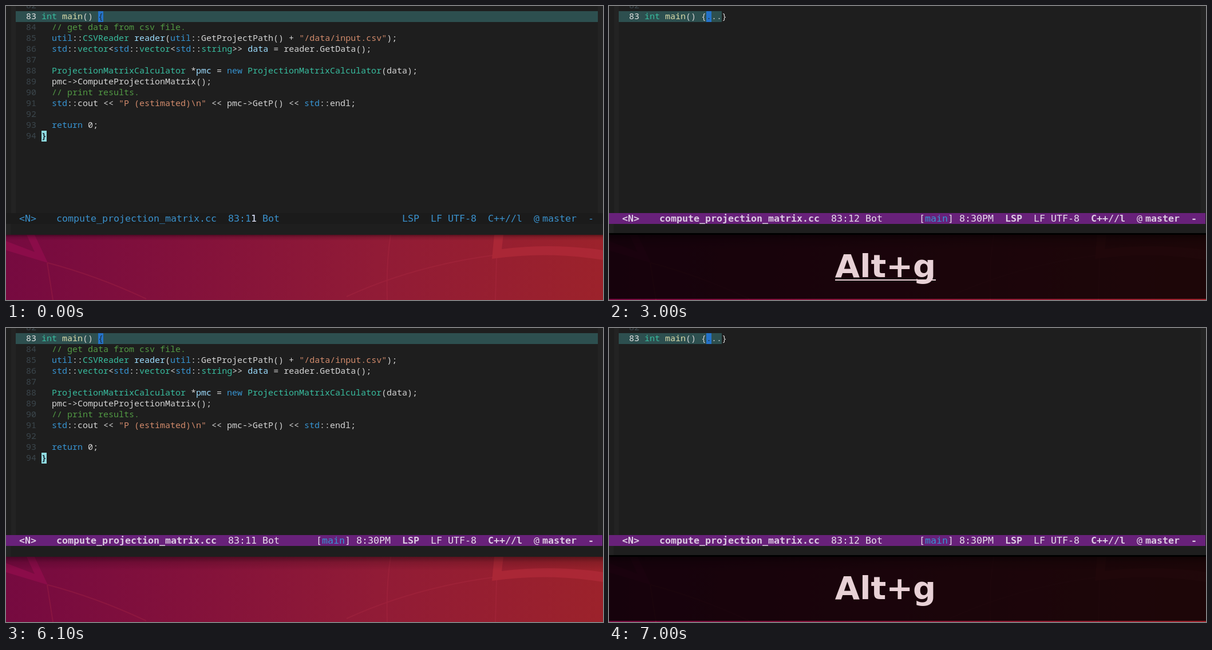
Recreate the animation shown at these times as an HTML page. Size 1043x514 px, loop 8000 ms.

```html
<!DOCTYPE html>
<html lang="en">
<head>
<meta charset="utf-8">
<title>Code folding</title>
<style>
html, body { margin: 0; width: 100%; height: 100%; overflow: hidden; background: #1e1e1e; }
svg { display: block; width: 1043px; height: 514px; }
text { white-space: pre; }

.ed { font: 15px "Noto Sans Mono", monospace; fill: #d4d4d4; }
.ln { fill: #3b464c; }
.t { fill: #38bd9f; }
.k { fill: #3794d2; }
.v { fill: #9cdcfe; }
.f { fill: #dcdcaa; }
.c { fill: #529a44; }
.s { fill: #d18a6b; }
.n { fill: #e4e4e4; }
.d { fill: #1e2c38; }

.bar { font: 16.61px "DejaVu Sans Mono", monospace; }
.off { fill: #3a91cc; }
.on { fill: #e6dcea; }
.b { font-weight: bold; fill: #dccbe2; }
.key { font: bold 56px "DejaVu Sans", sans-serif; fill: #e8d1d6; text-anchor: middle; }

/* timeline: hard cuts in an 8 s loop */
.open, .fold, .idle, .live, .panel, .one, .two, .line {
  animation: 8s step-end infinite; visibility: hidden;
}
.open { animation-name: open; }
.fold { animation-name: fold; }
.idle { animation-name: idle; }
.live { animation-name: live; }
.panel { animation-name: panel; }
.one { animation-name: one; }
.two { animation-name: two; }
.line { animation-name: line; }
@keyframes open { 0%, 60% { visibility: visible } 37.5%, 85%, 100% { visibility: hidden } }
@keyframes fold { 0%, 60% { visibility: hidden } 37.5%, 85%, 100% { visibility: visible } }
@keyframes idle { 0% { visibility: visible } 18.75%, 100% { visibility: hidden } }
@keyframes live { 0% { visibility: hidden } 18.75%, 100% { visibility: visible } }
@keyframes panel { 0%, 76.25% { visibility: hidden } 37.5%, 86.25%, 100% { visibility: visible } }
@keyframes one { 0%, 60% { visibility: hidden } 37.5%, 86.25%, 100% { visibility: visible } }
@keyframes two { 0%, 76.25%, 100% { visibility: hidden } 60% { visibility: visible } }
@keyframes line { 0%, 38.75%, 87.5%, 100% { visibility: hidden } 37.5%, 86.25% { visibility: visible } }
</style>
</head>
<body>
<svg viewBox="0 0 1043 514">
  <defs>
    <linearGradient id="wall" gradientUnits="userSpaceOnUse" x1="0" y1="440" x2="1043" y2="490">
      <stop offset="0" stop-color="#760a40"/>
      <stop offset=".3" stop-color="#83113b"/>
      <stop offset=".62" stop-color="#911b36"/>
      <stop offset="1" stop-color="#9c222b"/>
    </linearGradient>
    <linearGradient id="shade" x1="0" y1="0" x2="0" y2="1">
      <stop offset="0" stop-opacity=".4"/>
      <stop offset=".4" stop-opacity=".14"/>
      <stop offset="1" stop-opacity="0"/>
    </linearGradient>
  </defs>

  <!-- wallpaper -->
  <rect y="400" width="1043" height="114" fill="url(#wall)"/>
  <path d="M0 411L50 430L36 400H50L73 449L0 427Z" fill="#920d4c" opacity=".75"/>
  <path d="M853 400H869L866 425Q955 414 1043 427V444Q945 428 849 442Z" fill="#b02a38" opacity=".75"/>
  <g fill="none" stroke="#b83048" stroke-width="2" opacity=".25">
    <path d="M72 449L82 514M73 449Q160 472 245 512"/>
    <path d="M672 400Q664 450 666 514M857 441L855 514M595 508Q710 455 850 436"/>
  </g>
  <rect class="idle" y="400" width="1043" height="10" fill="url(#shade)"/>
  <rect class="live" y="400" width="1043" height="24" fill="url(#shade)"/>

  <!-- editor -->
  <rect width="1043" height="400" fill="#1e1e1e"/>
  <path d="M9 0H17V362H9ZM1034 0H1043V362H1034ZM0 381H8V400H0Z" fill="#232323"/>

  <g class="ed">
    <text class="ln" x="35" y="4">82</text>
    <g class="open">
      <rect x="17" y="9" width="1017" height="19" fill="#2d4f4f"/>
      <rect x="62" y="218" width="9" height="19" fill="#8fdbe0"/>
      <text class="ln" x="35" y="42">84</text>
      <text class="ln" x="35" y="61">85</text>
      <text class="ln" x="35" y="80">86</text>
      <text class="ln" x="35" y="99">87</text>
      <text class="ln" x="35" y="118">88</text>
      <text class="ln" x="35" y="137">89</text>
      <text class="ln" x="35" y="156">90</text>
      <text class="ln" x="35" y="175">91</text>
      <text class="ln" x="35" y="194">92</text>
      <text class="ln" x="35" y="213">93</text>
      <text class="ln" x="35" y="232">94</text>
      <text class="c" x="80" y="42">// get data from csv file.</text>
      <text x="80" y="61"><tspan class="k">util</tspan>::<tspan class="t">CSVReader</tspan> <tspan class="v">reader</tspan>(<tspan class="k">util</tspan>::GetProjectPath() + <tspan class="s">"/data/input.csv"</tspan>);</text>
      <text x="80" y="80"><tspan class="k">std</tspan>::<tspan class="t">vector</tspan>&lt;<tspan class="k">std</tspan>::<tspan class="t">vector</tspan>&lt;<tspan class="k">std</tspan>::<tspan class="t">string</tspan>&gt;&gt; <tspan class="v">data</tspan> = reader.GetData();</text>
      <text x="80" y="118"><tspan class="t">ProjectionMatrixCalculator</tspan> *<tspan class="v">pmc</tspan> = <tspan class="k">new</tspan> <tspan class="t">ProjectionMatrixCalculator</tspan>(data);</text>
      <text x="80" y="137">pmc-&gt;ComputeProjectionMatrix();</text>
      <text class="c" x="80" y="156">// print results.</text>
      <text x="80" y="175"><tspan class="k">std</tspan>::cout &lt;&lt; <tspan class="s">"P (estimated)\n"</tspan> &lt;&lt; pmc-&gt;GetP() &lt;&lt; <tspan class="k">std</tspan>::endl;</text>
      <text x="80" y="213"><tspan class="k">return</tspan> 0;</text>
      <text class="d" x="62" y="232" font-weight="bold">}</text>
    </g>
    <g class="fold">
      <rect x="17" y="9" width="180" height="19" fill="#2d4f4f"/>
      <rect x="170" y="9" width="9" height="19" fill="#2472c8"/>
      <text x="161" y="23">{<tspan class="d">.</tspan>..}</text>
    </g>
    <text x="35" y="23"><tspan class="n">83</tspan> <tspan class="t">int</tspan> <tspan class="f">main</tspan>()</text>
    <g class="idle">
      <rect x="161.5" y="9.5" width="8" height="18" fill="none" stroke="#2472c8"/>
      <text x="161" y="23">{</text>
    </g>
    <g class="live"><g style="visibility:inherit">
      <svg x="161" y="9" width="9" height="19" class="cur">
        <g class="open">
          <rect class="act" width="9" height="19" fill="#2472c8"/>
          <text class="d" y="14">{</text>
        </g>
      </svg>
    </g></g>
  </g>

  <!-- status bar -->
  <g class="bar">
    <g class="idle off">
      <rect y="362" width="1043" height="19" fill="#1b1b1b"/>
      <text x="23" y="377">&lt;N&gt;</text>
      <text x="88" y="377">compute_projection_matrix.cc</text>
      <text x="388" y="377">83:11 Bot</text>
      <text x="692" y="377">LSP</text>
      <text x="742" y="377">LF UTF-8</text>
      <text x="842" y="377">C++//l</text>
      <text x="922" y="377">@</text>
      <text x="937" y="377">master</text>
      <text x="1017" y="377">-</text>
    </g>
    <g class="live on">
      <rect y="362" width="1042" height="19" fill="#68217a"/>
      <text class="b" x="23" y="377">&lt;N&gt;</text>
      <text class="b" x="88" y="377">compute_projection_matrix.cc</text>
      <text x="388" y="377">83:1</text>
      <text x="438" y="377"> Bot</text>
      <text x="542" y="377">[<tspan class="k">main</tspan>]</text>
      <text x="612" y="377">8:30PM</text>
      <text class="b" x="692" y="377">LSP</text>
      <text x="742" y="377">LF UTF-8</text>
      <text class="b" x="842" y="377">C++//l</text>
      <text x="922" y="377">@</text>
      <text class="b" x="937" y="377">master</text>
      <text class="b" x="1017" y="377">-</text>
    </g>
    <text class="open on col" x="428" y="377">1</text>
    <text class="fold on" x="428" y="377">2</text>
  </g>

  <!-- pressed keys -->
  <g class="panel">
    <rect y="397" width="1043" height="115" opacity=".81"/>
    <rect y="397" width="1043" height="3"/>
  </g>
  <g class="key">
    <text class="one" x="483" y="474">Alt+g</text>
    <text class="two" x="483" y="474">Alt+g Alt+g</text>
    <rect class="line" x="395" y="478" width="176" height="2"/>
  </g>
</svg>
</body>
</html>
```
